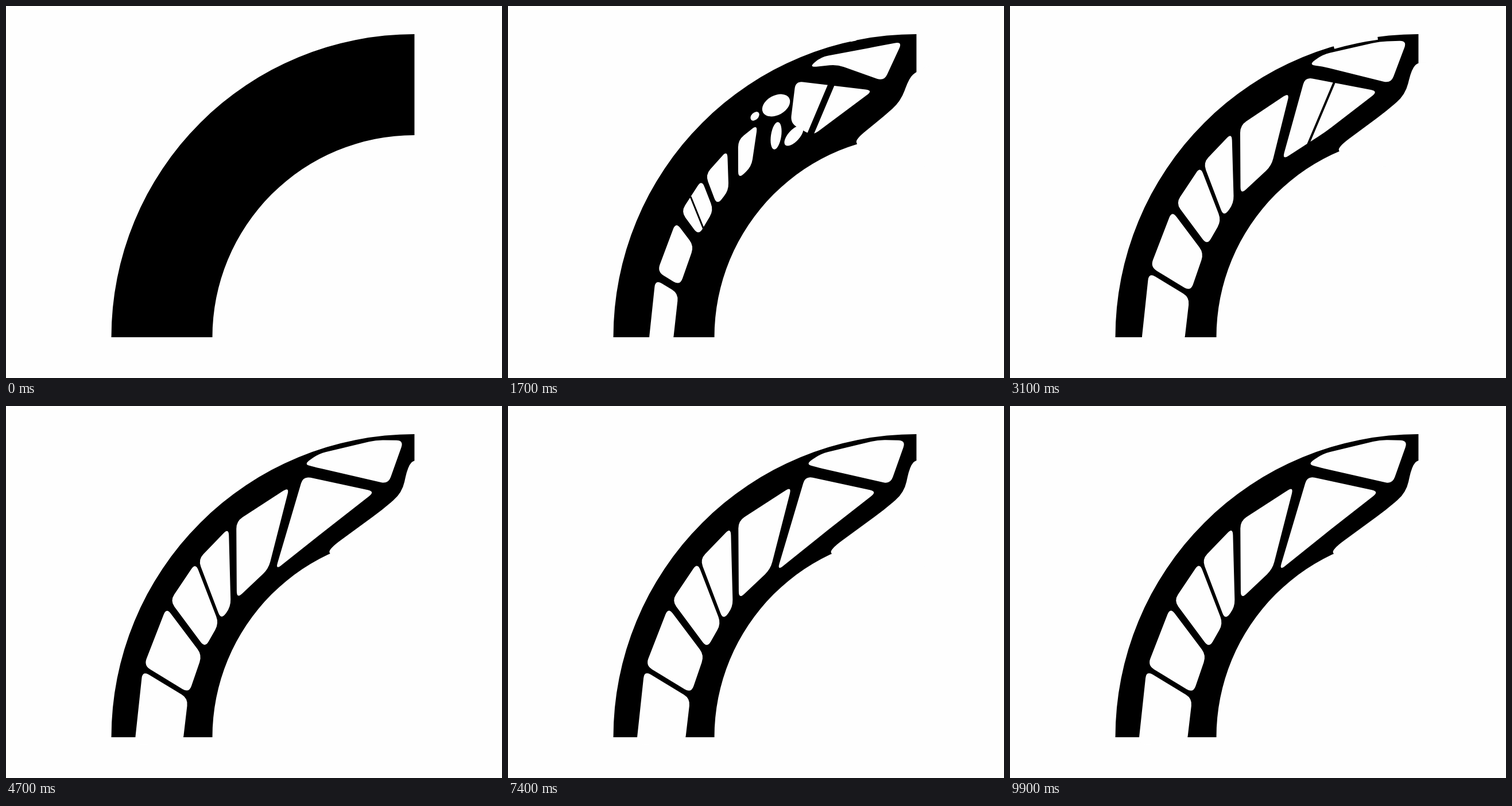
An HTML page with a canvas for the animation above (10000 ms loop, 864 px wide and 648 px high).

```html
<!DOCTYPE html>
<html lang="en">
<head>
<meta charset="utf-8">
<title>Arch optimisation</title>
<style>
  html, body { margin: 0; width: 100%; height: 100%; overflow: hidden; background: #fefefe; }
  canvas { display: block; }
</style>
</head>
<body>
<canvas id="stage" width="864" height="648"></canvas>
<script>
const ctx = document.getElementById('stage').getContext('2d');
const PAPER = '#fefefe', INK = '#000';
const LOOP = 10000, STEP = 100;
const T_HOLES = 1.7, T_SEEDS = 2.5;
const CX = 711.5, CY = 577, R_OUT = 528, R_IN = 352;
const RAD = Math.PI / 180;

// Struts of the leg: angle at the outer flange, at the inner flange, width, early lean.
const STRUTS = [
  [-1.5, -1.5, 0, 0],
  [14.3, 10.4, 9, 0],
  [28.4, 22.1, 12, 0],
  [39, 30.7, 6, 0],
  [49.5, 36.6, 12, 0],
  [64.8, 50.6, 14, 24]
];

// Key corners of the free end, when the holes are young and when they are settled.
const HEAD = {
  web: {
    young: [492,204, 501,131, 636,147, 530,226],
    settled: [469,287, 518,122, 643,149, 556,217]
  },
  tip: {
    young: [524,107, 545,89, 640,71, 687,62, 655,131, 573,102],
    settled: [519,101, 545,83, 645,59, 693,60, 666,136, 535,106]
  },
  notch: {
    young: [712,114, 699,125, 684,166, 655,192, 608,230, 606,241],
    settled: [712,92, 700,105, 690,151, 655,181, 566,246, 560,259]
  }
};
const NOTCH_BACK = [640,280, 740,280, 740,100];
const NOTCH_PIVOT = [720, 270];

// Short-lived parts: seed holes (x, y, rx, ry, tilt) and braces (x1, y1, x2, y2, width, end).
const SEEDS = [
  [467,173, 26,17, -0.5], [467,226, 9,24, 0.15],
  [498,226, 22,10, -0.83], [430,192, 9,6, -0.8]
];
const BRACES = [
  [318,332, 341,389, 20, 2],
  [572,116, 515,251, 19.5, 3.9]
];

const mix = (a, b, k) => a.map((v, i) => v + (b[i] - v) * k);
const polar = (r, deg) => [CX - r * Math.cos(deg * RAD), CY - r * Math.sin(deg * RAD)];

function centre(pts) {
  const c = [0, 0];
  pts.forEach((v, i) => { c[i % 2] += v * 2 / pts.length; });
  return c;
}

function scale(pts, k, pivot = centre(pts)) {
  return pts.map((v, i) => pivot[i % 2] + (v - pivot[i % 2]) * k);
}

// Fills a closed polygon with softened corners.
function fillSoft(pts, soft = 13) {
  const n = pts.length / 2;
  const at = i => { const j = (i + n) % n * 2; return [pts[j], pts[j + 1]]; };
  const toward = (p, q) => {
    const len = Math.hypot(q[0] - p[0], q[1] - p[1]) || 1;
    return mix(p, q, Math.min(soft / len, 0.5));
  };
  ctx.beginPath();
  for (let i = 0; i < n; i++) {
    const p = at(i);
    ctx.lineTo(...toward(p, at(i - 1)));
    ctx.quadraticCurveTo(...p, ...toward(p, at(i + 1)));
  }
  ctx.closePath();
  ctx.fill();
}

// Corner where one side of a strut meets a flange; end is 1 outside, -1 inside.
function corner([outer, inner, width, lean], end, side, open) {
  const v = end * open;
  const deg = (outer + inner + v * (outer - inner)) / 2 - lean * (1 - open) ** 2;
  const r = 445.5 - 0.15 * deg + v * (42.5 + 0.15 * deg);
  const slant = Math.hypot(1, (outer - inner) * RAD * 440 / 95);
  const half = width * (2 - open) * slant / 2 / r / RAD;
  return polar(r, deg + side * half);
}

function cell(a, b, open) {
  return [
    ...corner(a, -1, 1, open), ...corner(a, 1, 1, open),
    ...corner(b, 1, -1, open), ...corner(b, -1, -1, open)
  ];
}

function drawArch() {
  ctx.fillStyle = PAPER;
  ctx.fillRect(0, 0, 864, 648);
  ctx.fillStyle = INK;
  ctx.beginPath();
  ctx.arc(CX, CY, R_OUT, Math.PI, Math.PI * 1.5);
  ctx.arc(CX, CY, R_IN, Math.PI * 1.5, Math.PI, true);
  ctx.fill();
}

// A shallow bite out of the outer edge that comes and goes.
function drawBite(t) {
  const s = Math.exp(-(((t - 3) / 0.9) ** 2));
  if (s < 0.02) return;
  ctx.strokeStyle = PAPER;
  ctx.lineWidth = 10 * s;
  ctx.beginPath();
  ctx.arc(CX, CY, R_OUT, (258 - 4.3 * s) * RAD, (258 + 4.3 * s) * RAD);
  ctx.stroke();
}

function drawSeeds(grow) {
  for (const [x, y, rx, ry, tilt] of SEEDS) {
    ctx.beginPath();
    ctx.ellipse(x, y, rx * grow, ry * grow, tilt, 0, Math.PI * 2);
    ctx.fill();
  }
}

function drawBraces(t) {
  ctx.strokeStyle = INK;
  for (const [x1, y1, x2, y2, width, end] of BRACES) {
    if (t >= end) continue;
    ctx.lineWidth = width * (1 - t / end);
    ctx.beginPath();
    ctx.moveTo(x1, y1);
    ctx.lineTo(x2, y2);
    ctx.stroke();
  }
}

function draw(t) {
  drawArch();
  if (t === 0) return;
  const open = Math.max(0.5, 1 - Math.exp(-((t / 2.06) ** 1.9)));
  const grow = Math.min(1, t / T_HOLES) ** 0.4;
  const head = part => mix(part.young, part.settled, 2 * open - 1);

  ctx.fillStyle = PAPER;
  for (let i = 1; i < STRUTS.length; i++) {
    fillSoft(scale(cell(STRUTS[i - 1], STRUTS[i], open), grow));
  }
  fillSoft(scale(head(HEAD.web), grow));
  fillSoft(scale(head(HEAD.tip), grow));
  fillSoft(scale(head(HEAD.notch), grow, NOTCH_PIVOT).concat(NOTCH_BACK), 20);
  if (t < T_SEEDS) drawSeeds(grow);
  drawBraces(t);
  drawBite(t);
}

let start;
function tick(now) {
  if (start === undefined) start = now;
  draw(Math.floor((now - start) % LOOP / STEP) * STEP / 1000);
  requestAnimationFrame(tick);
}
draw(0);
requestAnimationFrame(tick);
</script>
</body>
</html>
```
